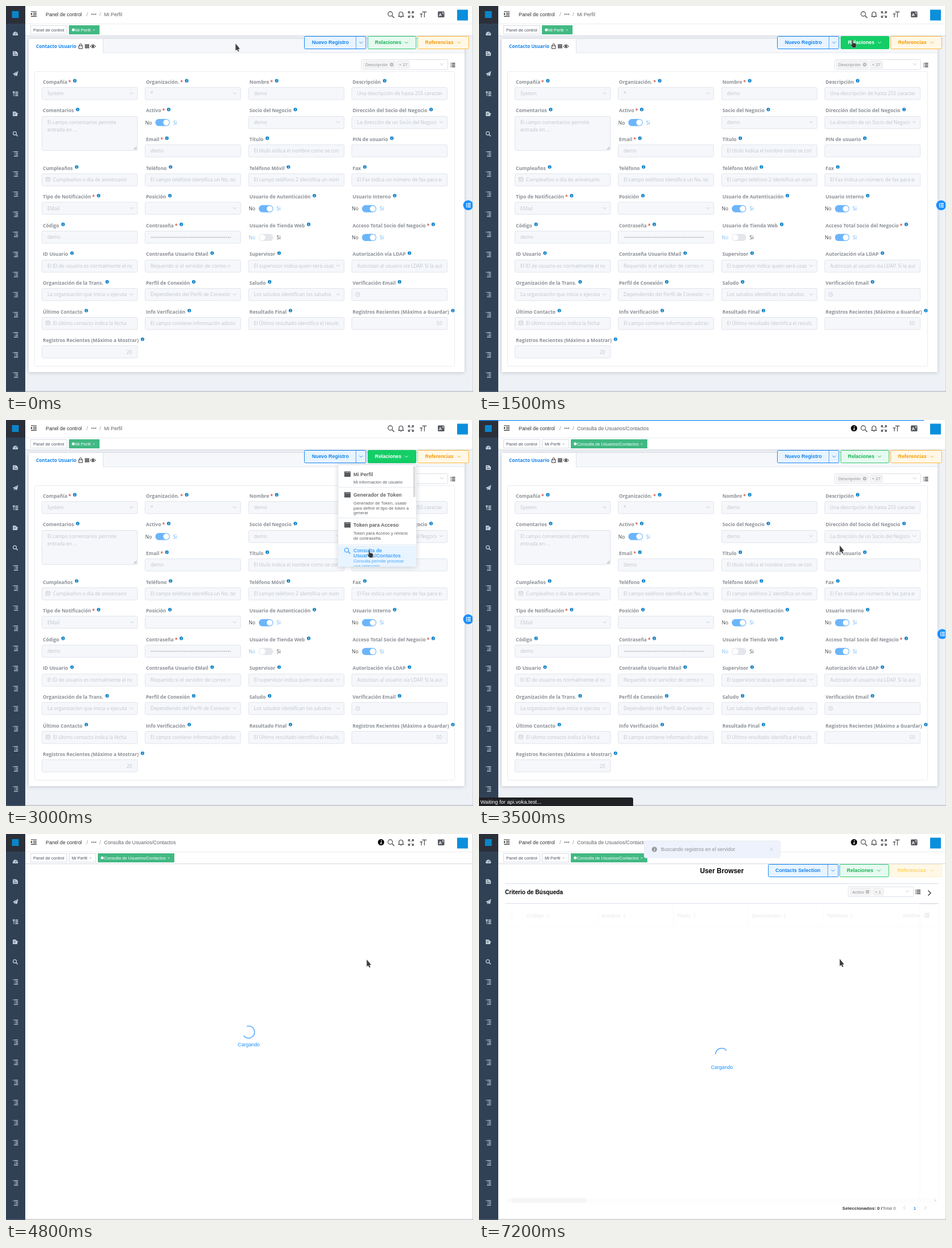
Animation, 824 px wide and 680 px high, one loop 8000 ms. Source, as an HTML page:

```html
<!DOCTYPE html>
<html lang="es">
<head>
<meta charset="utf-8">
<title>Mi Perfil</title>
<style>
html, body { margin: 0; width: 100%; height: 100%; overflow: hidden; background: #fff; }
svg { display: block; }
#stage { position: absolute; left: 0; top: 0; overflow: hidden; }
text { font: 8.84px "Liberation Sans", Arial, sans-serif; fill: #303133; white-space: pre; }
.b { font-weight: bold; }
.s { font-size: 7.58px; }
.f { font: 8.5px "Open Sans", sans-serif; fill: #c0c4cc; }
.l { font: bold 8.55px "Open Sans", sans-serif; fill: #8c9097; }
.tab { font: bold 8.2px "Open Sans", sans-serif; }
.title { font-size: 11.85px; }
.sub { font-size: 10.1px; }
.foot { font-size: 8.1px; }
.url { font-size: 9.4px; }

/* every part runs on the same 8 s clock */
.a { animation: 8s linear -30ms infinite; }
.k { animation-timing-function: step-end; }
#cursor { animation-name: cursor; }
#arrow { animation-name: arrow; }
#hand { animation-name: hand; }
#relHot { animation-name: relHot; }
#menu { animation-name: menu; transform-origin: 655px 79px; }
#hot0 { animation-name: hot0; }
#hot1 { animation-name: hot1; }
#hot2 { animation-name: hot2; }
#hot3 { animation-name: hot3; }
#navA { animation-name: navA; }
#navB { animation-name: navB; }
#profile { animation-name: profile; }
#fields { animation-name: fields; }
#fab { animation-name: fab; }
#progress { animation-name: progress; transform-origin: 0 0; }
#status { animation-name: status; }
#loader { animation-name: loader; }
#turn { animation-name: turn; transform-origin: 428px 349px; }
#dash { animation-name: dash; }
#browser { animation-name: browser; }
#mask { animation-name: mask; }
#arc { animation-name: arc; transform-origin: 428px 388px; }
#message { animation-name: message; }

@keyframes cursor {
  0%, 5% { transform: translate(404.5px, 66px); animation-timing-function: ease-in-out; }
  15%, 16.6% { transform: translate(802px, 11px); animation-timing-function: ease-in-out; }
  18.7%, 27% { transform: translate(655px, 59px); animation-timing-function: ease-in-out; }
  30%, 36.8% { transform: translate(638px, 203px); }
  37.5%, 40% { transform: translate(637px, 228px); }
  41%, 89.99% { transform: translate(636px, 221px); }
  90%, 100% { transform: translate(636px, 220px); }
}
@keyframes arrow { 0% { opacity: 1 } 14% { opacity: 0 } 40% { opacity: 1 } }
@keyframes hand { 0% { opacity: 0 } 14% { opacity: 1 } 40% { opacity: 0 } }
@keyframes relHot { 0% { opacity: 0 } 18.5% { opacity: 1 } 40% { opacity: 0 } 100% { opacity: 0 } }
@keyframes menu {
  0%, 20% { opacity: 0; transform: scaleY(0); animation-timing-function: ease-out; }
  23.7%, 40% { opacity: 1; transform: none; }
  42.5% { opacity: 0; transform: scaleY(0); }
  100% { opacity: 0; transform: scaleY(0); }
}
@keyframes hot0 { 0% { opacity: 0 } 27.5% { opacity: 1 } 28.6% { opacity: 0 } 100% { opacity: 0 } }
@keyframes hot1 { 0% { opacity: 0 } 28.6% { opacity: 1 } 29.6% { opacity: 0 } 100% { opacity: 0 } }
@keyframes hot2 { 0% { opacity: 0 } 29.6% { opacity: 1 } 37.4% { opacity: 0 } 100% { opacity: 0 } }
@keyframes hot3 { 0% { opacity: 0 } 37.4% { opacity: 1 } 100% { opacity: 1 } }
@keyframes navA { 0% { opacity: 1 } 44% { opacity: 0 } 100% { opacity: 0 } }
@keyframes navB { 0% { opacity: 0 } 44% { opacity: 1 } 100% { opacity: 1 } }
@keyframes profile {
  0%, 45% { opacity: 1; transform: none; }
  46.25%, 46.9% { opacity: .65; transform: translateX(8px); }
  50%, 100% { opacity: 0; transform: translateX(30px); }
}
@keyframes fields { 0%, 45% { opacity: 1 } 46.25%, 100% { opacity: .78 } }
@keyframes fab { 0% { transform: none } 44% { transform: translate(2px, 26px) } 100% { transform: translate(2px, 26px) } }
@keyframes progress {
  0%, 40% { opacity: 1; transform: scaleX(0); animation-timing-function: ease-out; }
  45% { opacity: 1; transform: none; }
  46.5% { opacity: .5; transform: none; }
  49%, 100% { opacity: 0; transform: none; }
}
@keyframes status { 0% { opacity: 0 } 42.5% { opacity: 1 } 50% { opacity: 0 } 100% { opacity: 0 } }
@keyframes loader {
  0%, 50% { opacity: 0; transform: translateX(-30px); animation-timing-function: ease; }
  56.25%, 74.99% { opacity: 1; transform: none; }
  75%, 100% { opacity: 0; transform: none; }
}
@keyframes turn { 0%, 50.625% { transform: none } 70%, 100% { transform: rotate(279deg) } }
@keyframes dash {
  0%, 50.625% { stroke-dasharray: 1 200; stroke-dashoffset: 0; animation-timing-function: ease-in-out; }
  60% { stroke-dasharray: 90 150; stroke-dashoffset: -40; animation-timing-function: ease-in-out; }
  69.37% { stroke-dasharray: 90 150; stroke-dashoffset: -120; }
  69.38% { stroke-dasharray: 1 200; stroke-dashoffset: 0; }
  70%, 100% { stroke-dasharray: 2 200; stroke-dashoffset: -.5; }
}
@keyframes browser { 0% { opacity: 0 } 75% { opacity: 1 } 100% { opacity: 1 } }
@keyframes mask { 0% { opacity: 0 } 77.5% { opacity: 1 } 100% { opacity: 1 } }
@keyframes arc {
  0% { transform: rotate(20deg); stroke-dasharray: 60 360; }
  82.5% { transform: rotate(180deg); stroke-dasharray: 145 360; }
  100% { transform: rotate(180deg); stroke-dasharray: 145 360; }
}
@keyframes message { 0% { opacity: 0 } 77.5% { opacity: .5 } 82.5% { opacity: 1 } 100% { opacity: 1 } }
</style>
</head>
<body>
<svg id="stage" width="824" height="680" viewBox="0 0 824 680"></svg>
<script>
const pen = document.createElement('canvas').getContext('2d');
const widthOf = (s, font) => { pen.font = font; return pen.measureText(s).width; };

const text = (x, y, s, cls = '', fill = '', anchor = '') =>
  `<text x="${x}" y="${y}" class="${cls}"${fill && ` style="fill:${fill}"`}${anchor && ` text-anchor="${anchor}"`}>${s}</text>`;
const rect = (x, y, w, h, fill, line = 'none', r = 0, extra = '') =>
  `<rect x="${x}" y="${y}" width="${w}" height="${h}" fill="${fill}" stroke="${line}" rx="${r}" ${extra}/>`;
const line = (d, color, w = 1, extra = '') =>
  `<path d="${d}" fill="none" stroke="${color}" stroke-width="${w}" ${extra}/>`;
const shape = (d, fill) => `<path d="${d}" fill="${fill}"/>`;
const disc = (x, y, r, fill) => `<circle cx="${x}" cy="${y}" r="${r}" fill="${fill}"/>`;
const ring = (x, y, r, color, w = 1, extra = '') =>
  `<circle cx="${x}" cy="${y}" r="${r}" fill="none" stroke="${color}" stroke-width="${w}" ${extra}/>`;
const group = (id, body, step = true) => `<g id="${id}" class="a${step ? ' k' : ''}">${body}</g>`;
const clip = (x, y, w, h, body) => `<svg x="${x}" y="${y}" width="${w}" height="${h}">${body}</svg>`;

const caret = (x, y, color = '#c0c4cc') => line(`M${x - 3} ${y - 1.5}l3 3 3-3`, color, .9);
const cross = (x, y, r, color) => line(`M${x - r} ${y - r}l${2 * r} ${2 * r}m0 ${-2 * r}l${-2 * r} ${2 * r}`, color, .8);
const info = (x, y, r, fill) => disc(x, y, r, fill) +
  line(`M${x + r * .1} ${y - r * .6}v${r * .3}m0 ${r * .2}l${-r * .15} ${r * .75}`, '#fff', r * .3);
const lens = (x, y, r, color, w) => ring(x - 1, y - 1, r, color, w) +
  line(`M${x - 1 + r * .75} ${y - 1 + r * .75}l${r} ${r}`, color, w * 1.3);
const list = (x, y, color, w = 8) => [-3, 0, 3].map(d =>
  line(`M${x - w / 2} ${y + d}h1.3m1 0h${w - 2.3}`, color, 1.3)).join('');

function sidebar() {
  const c = '#c5d0dc', at = n => 48.3 + 35.4 * n;
  let s = rect(0, 0, 34, 680, '#304156') + rect(0, 0, 34, 31, '#2b2f3a') + rect(10.5, 9, 12, 12, '#0b86c9');
  let y = at(0);
  s += shape(`M12.3 ${y + 3.5}a4.6 4.6 0 1 1 8.4 0z`, c) + line(`M16.5 ${y + 2}l1.3-3.6M13.5 ${y}h1M18.8 ${y}h1`, '#304156', .9);
  y = at(1);
  s += shape(`M12 ${y - 4}h6l3 3v5h-9z`, c) + line(`M13.5 ${y - 1.5}h3M13.5 ${y + 1.5}h6`, '#304156');
  y = at(2);
  s += shape(`M12 ${y + .5}l9.5-5-2 9-3-1.5-1.8 1.8v-2.6z`, c) + line(`M14.8 ${y + 2}l5-5`, '#304156', .6);
  y = at(3);
  s += rect(12, y - 4, 3.5, 2.4, c) + line(`M13.3 ${y - 2}v5.4h3M13.3 ${y}h3`, c, .8) +
    [-2.8, .2, 3.2].map(d => line(`M16.6 ${y + d}h4.8`, c, 1.8)).join('');
  y = at(4);
  s += shape(`M12 ${y - 4}h5l3 3v5h-8z`, c) + line(`M13.5 ${y - 1}h4M13.5 ${y + 1.2}h3`, '#304156', .8) +
    line(`M17 ${y + 3}l4-3.5`, c, 1.4);
  s += lens(16.5, at(5), 3, c, 1.2);
  for (let n = 6; n < 18; n++) {
    y = at(n);
    s += line(`M12 ${y - 4}h1.2m1 0h7M15 ${y - 1.3}h1m1 0h4.2M15 ${y + 1.4}h1m1 0h4.2M14 ${y + 4}h7.2`, c, 1.2);
  }
  return s;
}

function topBar() {
  const c = '#55585e';
  return rect(34, 0, 790, 52, '#fff') + line('M34 31.5H824', '#ebedf0') + line('M34 52.5H824', '#d3d7df') +
    line('M44 10h10M48 12.8h6M48 15.5h6M44 18.2h10', '#222', 1.2) + shape('M44 12l2.8 2.1-2.8 2.1z', '#222') +
    text(70, 17.5, 'Panel de control') + text(142, 17.5, '/', '', '#909399') +
    [151.8, 155, 158.2].map(x => disc(x, 14.5, 1.1, '#555')).join('') + text(165, 17.5, '/', '', '#909399') +
    lens(679, 15, 4, c, 1.3) +
    line('M692 18.3h10M693.5 18v-4a3.5 3.5 0 0 1 7 0v4M695.8 20h2.4', '#444', 1.2) +
    line('M710 13v-3h3m3 0h3v3m0 4v3h-3m-3 0h-3v-3M710.3 10.3l3 3m2.4 3.4l3 3m0-9.4l-3 3m-2.4 3.4l-3 3', c, 1.3) +
    line('M734.5 10.5h7.5M738.3 10.5V20M730.5 14h4.5M732.8 14v6', c, 1.3) +
    rect(762, 9.5, 11.5, 10.5, c, 'none', 1.5) + text(763.6, 17.8, 'A', 'b s', '#fff') + line('M769.5 12h3M771 11v3.5', '#fff', .8) +
    rect(796, 6.5, 19, 19, '#0b8fdc');
}

function tag(x, w, s, active, closable = true) {
  return rect(x + .5, 34.5, w - 1, 15, active ? '#42b983' : '#fff', active ? '#42b983' : '#d8dce5') +
    (active ? disc(x + 7.8, 42, 2.5, '#fff') : '') +
    text(x + (active ? 11 : 5), 45, s, 's', active ? '#fff' : '#495060') +
    (closable ? cross(x + w - 10, 42.3, 1.2, active ? '#d5efe4' : '#aaa') : '');
}

const blue = ['#e8f4ff', '#1587f5', '#1283f0'], green = ['#e7faf0', '#2fc873', '#16b455'],
  amber = ['#fff8e6', '#ffb83a', '#f79a08'], pale = ['#fff8e6', '#fff0cc', '#ffd466'], solid = ['#13ce66', '#13ce66', '#fff'];
function button(x, w, s, tx, cx, [bg, edge, ink], split) {
  return rect(x + .5, 53.5, w - 1, 22, bg, edge, 2) + text(tx, 67.4, s, 'b', ink) +
    caret(cx, 64.3, ink) + (split ? line(`M${split + .5} 54v21`, edge, .7) : '');
}

function filter(x, w, tags, y) {
  let s = rect(x + .5, y + .5, w - 1, 17.5, '#fff', '#dcdfe6', 2);
  tags.forEach(([tx, tw, label, closable]) => {
    s += rect(tx, y + 3, tw, 12.5, '#f4f4f5', '#e9e9eb', 2) + text(tx + 3.5, y + 12, label, 's', '#909399');
    if (closable) s += disc(tx + tw - 6.5, y + 9.2, 3.2, '#b4b6ba') + cross(tx + tw - 6.5, y + 9.2, 1.1, '#fff');
  });
  return s + caret(x + w - 11, y + 8.5);
}

// column, row, label (* = required), kind, value
const formRows = `0|0|Compañía*|select|System
0|1|Comentarios|area|
0|3|Cumpleaños|date|Cumpleaños o día de aniversario
0|4|Tipo de Notificación*|select|EMail
0|5|Código|text|demo
0|6|ID Usuario|text|El ID de usuario es normalmente el nombre
0|7|Organización de la Trans.|select|La organización que inicia o ejecuta la
0|8|Último Contacto|date|El último contacto indica la fecha en
0|9|Registros Recientes (Máximo a Mostrar)|number|20
1|0|Organización.*|select|*
1|1|Activo*|on|
1|2|Email*|text|demo
1|3|Teléfono|text|El campo teléfono identifica un No. telefónico
1|4|Posición|select|
1|5|Contraseña*|dots|
1|6|Contraseña Usuario EMail|secret|Requerido si el servidor de correo requiere
1|7|Perfil de Conexión|select|Dependiendo del Perfil de Conexión
1|8|Info Verificación|text|El campo contiene información adicional
2|0|Nombre*|text|demo
2|1|Socio del Negocio|select|demo
2|2|Título|text|El título indica el nombre como se conoce
2|3|Teléfono Móvil|text|El campo teléfono 2 identifica un número
2|4|Usuario de Autenticación|on|
2|5|Usuario de Tienda Web|off|
2|6|Supervisor|select|El supervisor indica quien será usado
2|7|Saludo|select|Los saludos identifican los saludos
2|8|Resultado Final|text|El Último resultado identifica el resultado
3|0|Descripción|text|Una descripción de hasta 255 caracteres
3|1|Dirección del Socio del Negocio|select|La dirección de un Socio del Negocio
3|2|PIN de usuario|text|
3|3|Fax|text|El Fax indica un número de fax para este
3|4|Usuario Interno|on|
3|5|Acceso Total Socio del Negocio*|on|
3|6|Autorización vía LDAP|text|Autorizan al usuario vía LDAP. Si la autoriza
3|7|Verificación Email|clock|
3|8|Registros Recientes (Máximo a Guardar)|number|50`;

function field(row) {
  const [col, r, name, kind, value] = row.split('|');
  const x = [63, 245, 427.5, 609.5][col], y = 133.5 + 50.6 * r, top = Math.round(y + 9.5), base = y + 23.6;
  const label = name.replace('*', ''), need = label !== name;
  let end = x + 2 + widthOf(label, 'bold 8.55px "Open Sans"');
  let s = text(x + 2, y + 3.2, label, 'l');
  if (need) { s += text(end + 2, y + 3.2, '*', 'l', '#e0583f'); end += 6.5; }
  s += info(end + 6.8, y - 1.8, 3.1, '#1283c8');
  if (kind === 'on' || kind === 'off') {
    const on = kind === 'on', cy = y + 21.2;
    return s + text(x + .8, cy + 3.2, 'No', 'f', on ? '#44474c' : '#7fbdfa') +
      rect(x + 18.5, cy - 6.3, 25.5, 12.6, on ? '#6cb5fb' : '#e4e6ec', 'none', 6.3) +
      disc(x + (on ? 37.7 : 24.8), cy, 5.2, '#fff') + text(x + 50, cy + 3.2, 'Si', 'f', on ? '#5aabfa' : '#44474c');
  }
  s += rect(x + .5, top + .5, 168.5, kind === 'area' ? 60 : 21.5, '#f5f7fa', '#e0e4ec', 2);
  if (kind === 'area')
    return s + text(x + 10, top + 13.8, 'El campo comentarios permite', 'f') + text(x + 10, top + 26.8, 'entrada en ...', 'f') +
      line(`M${x + 162.5} ${top + 59}l5-5m-2 5l2-2`, '#777', .8);
  if (kind === 'dots')
    return s + line(`M${x + 12} ${top + 11.5}h139`, '#b2b6be', 2.2, 'stroke-linecap="round" stroke-dasharray="0 3.22"');
  if (kind === 'number') return s + text(x + 159.5, base, value, 'f', '', 'end');
  if (kind === 'clock') return s + ring(x + 11, y + 20.5, 3.6, '#c0c4cc', .8) + line(`M${x + 11} ${y + 18.5}v2.2h2`, '#c0c4cc', .8);
  const dx = kind === 'date' ? 20 : 10, room = kind === 'text' ? 159.5 : 150.5;
  if (kind === 'date') s += rect(x + 7.5, y + 17, 7, 6.6, 'none', '#c0c4cc', .5, 'stroke-width=".8"') +
    line(`M${x + 7.5} ${y + 19.3}h7M${x + 9.3} ${y + 16}v2m3.4-2v2M${x + 9} ${y + 21.4}h4`, '#c0c4cc', .7);
  if (kind === 'select') s += caret(x + 158.5, y + 20.3);
  return s + clip(x + dx, top, room - dx, 22, text(0, base - top, value, 'f'));
}

function profile() {
  const strip = rect(34, 53, 790, 627, '#eef1f6') +
    rect(40, 58, 769, 587, '#fff', 'none', 0, 'style="filter:drop-shadow(0 1px 3px rgba(0,0,0,.18))"') +
    rect(40, 58, 769, 24.5, '#f5f7fa') + line('M40 82.5H809', '#e4e7ed') + rect(40, 58, 131, 26, '#fff') + line('M171.5 58v25', '#dfe3ea') +
    text(53, 74.3, 'Contacto Usuario', 'tab', '#1683ee') +
    rect(128.5, 70, 6.4, 5, 'none', '#333') + line('M129.8 70v-1.5a1.9 1.9 0 0 1 3.8 0V70', '#333') +
    line('M139 68.5h8M139 71h8M139 73.5h8', '#222', 1.4) +
    line('M149 71q4.5-5.5 9 0q-4.5 5.5-9 0z', '#222') + disc(153.5, 71, 1.7, '#222');
  const tools = button(526, 109.5, 'Nuevo Registro', 539.7, 626.5, blue, 617) +
    button(638, 86, 'Relaciones', 651, 706.5, green) + button(726, 91, 'Referencias', 739.5, 799.5, amber) +
    group('relHot', button(638, 86, 'Relaciones', 651, 706.5, solid));
  const form = filter(627, 153, [[630.5, 56.5, 'Descripción', true], [690, 22, '+ 27']], 94) +
    rect(50.5, 115.5, 741, 519, 'none', '#e9ecf2', 2) + formRows.split('\n').map(field).join('');
  const fab = disc(815.5, 351, 8.8, '#1890ff') + list(816, 351, '#fff', 8) + line('M812.6 348v6', '#fff', .8);
  return group('profile', strip + tools + list(788.5, 104, '#333') + group('fields', form, false) + group('fab', fab), false);
}

const items = [
  [82, 36, 98.6, ['Mi Perfil'], ['Mi información de usuario']],
  [119, 53, 135, ['Generador de Token'], ['Generador de Token, usado', 'para definir el tipo de token a', 'generar']],
  [175, 44, 188, ['Token para Acceso'], ['Token para Acceso y reinicio', 'de contraseña']],
  [221, 37, 233.2, ['Consulta de', 'Usuarios/Contactos'], ['Consulta permite procesar', 'una selección']]
];
function item([top, h, y, titles, subs], n, hot) {
  const ink = hot ? '#46a6ff' : '#606266', subY = y + (n === 3 ? 17.6 : 13.8);
  return (hot ? rect(586.5, top, 137, h, '#e8f4ff') : '') +
    (n === 3 ? lens(602, y - 3, 3.6, ink, 1.3)
      : rect(597, y - 8, 11, 9.5, '#55585d') + line(`M599 ${y - 6.2}h2m1 0h2m1 0h2`, '#fff', .8)) +
    titles.map((s, i) => text(613, y + i * 9, s, 'b', ink)).join('') +
    subs.map((s, i) => text(613, subY + i * 8.8, s, 's', ink)).join('') +
    (n < 3 ? line(`M587 ${[118.5, 172.5, 219.5][n]}h136`, '#e4e8ef') : '');
}
function menu() {
  const body = items.map((d, n) => item(d, n)).join('') + items.map((d, n) => group('hot' + n, item(d, n, true))).join('');
  return group('menu', shape('M676 80l4-4 4 4z', '#fff') +
    rect(586, 79, 138, 179, '#fff', '#e6ebf5', 2, 'style="filter:drop-shadow(0 1px 4px rgba(0,0,0,.16))"') +
    clip(0, 0, 824, 258, body) + rect(718.5, 81, 4, 55, '#d9dbde', 'none', 2), false);
}

function table() {
  const xs = [77, 209.5, 342.5, 475, 607.5, 740.5], edge = '#dfe4ec';
  let head = rect(53.5, 139.5, 8, 8, '#edf2fc', '#dcdfe6', 1);
  ['Código', 'Nombre', 'Título', 'Descripción', 'Teléfono', 'Teléfono Móvil'].forEach((name, i) => {
    const x = xs[i] + 6.7, end = x + widthOf(name, 'bold 8.84px "Liberation Sans"') + 7;
    head += line(`M${xs[i]} 125v37`, edge) + text(x, 147, name, 'b', '#909399') +
      shape(`M${end - 3} 142.6l3-3.4 3 3.4zM${end - 3} 144.2l3 3.4 3-3.4z`, '#c0c4cc');
  });
  return line('M47 162.5H811', edge) + clip(0, 0, 779, 680, head) +
    rect(779, 125, 31, 516, '#fff', 'none', 0, 'style="filter:drop-shadow(-1px 0 3px rgba(0,0,0,.12))"') +
    line('M779 162.5h32M810.5 125v37', edge) + list(790, 143, '#555', 10) +
    rect(47, 641, 764, 9.5, '#f1f1f1') + rect(57, 641.5, 132, 8, '#c1c1c1') +
    shape('M53.5 643.2v4.6l-3-2.3z', '#a5a5a5') + shape('M804 643.2v4.6l3-2.3z', '#505050');
}

function browser() {
  const page = rect(34, 53, 789, 625, '#fff') + text(428.5, 69, 'User Browser', 'b title', '#000', 'middle') +
    button(510, 124.5, 'Contacts Selection', 523, 624.5, blue, 615) +
    button(636, 87.5, 'Relaciones', 649, 705.5, green) + button(725, 92, 'Referencias', 738.5, 799, pale) +
    line('M46 87.5H811M46 122.5H811', '#d9dee8') + text(46, 106.2, 'Criterio de Búsqueda', 'b sub', '#000') +
    filter(651, 116, [[655, 37, 'Activo', true], [695, 19, '+ 1']], 92.5) + list(774.5, 102, '#333', 9) +
    line('M792.5 99.5l4.5 4.5-4.5 4.5', '#222', 1.2) + table() +
    text(641, 662, '<tspan class="b">Seleccionados: 0 /</tspan><tspan fill="#606266">Total 0</tspan>', 'foot') +
    line('M752 655.5l-3 3 3 3M786 655.5l3 3-3 3', '#b8bcc4', .9) + text(766.7, 661.5, '1', 'b s', '#1890ff');
  const mask = rect(46, 124, 766, 527, 'rgba(255,255,255,.83)') +
    ring(428, 388, 10.7, '#409eff', 1.3, 'id="arc" class="a k" pathLength="360"') + text(409.2, 413.6, 'Cargando', '', '#1890ff');
  return group('browser', page + group('mask', mask));
}

const loader = group('loader', group('turn', ring(428, 349, 10.7, '#409eff', 1.3,
  'id="dash" class="a" pathLength="125.6" stroke-linecap="round"'), false) + text(409, 374.2, 'Cargando', '', '#1890ff'), false);
const navA = group('navA', text(173, 17.5, 'Mi Perfil', '', '#5f6268') + tag(111, 54, 'Mi Perfil', true));
const navB = group('navB', text(173, 17.5, 'Consulta de Usuarios/Contactos', '', '#5f6268') +
  info(661.7, 14.5, 5.5, '#000') + tag(111, 48, 'Mi Perfil') + tag(162, 135, 'Consulta de Usuarios/Contactos', true));
const message = group('message', rect(291.5, 12, 240, 30, '#edf2fc', '#e8ecf5', 3) + info(309.5, 27, 4.5, '#909399') +
  text(321, 30, 'Buscando registros en el servidor', '', '#909399') + cross(516, 27, 2.6, '#c0c4cc'));
const status = group('status', shape('M0 665h269q3 0 3 3v12H0z', '#202124') +
  text(2.5, 676, 'Waiting for api.voka.test...', 'url', '#fff'));
const arrowPath = 'M.5 0v12.8l2.6-2.4 2 4 1.8-1-1.7-3.5 3-.3z';
const cursor = group('cursor',
  group('arrow', line(arrowPath, '#fff', 1.2) + shape(arrowPath, '#3c3c3c')) +
  group('hand', `<path d="M3 1.2q1-1.4 2 0v4.6l4.6 1.2q1.4.5 1.2 2l-.9 5.6H4.6L.7 9.8q-.6-1.5.8-1.3L3 9.6z" fill="#333" stroke="#ddd" stroke-width=".5"/>`), false);

document.getElementById('stage').innerHTML = rect(0, 0, 824, 680, '#fff') + profile() + loader + browser() +
  topBar() + tag(43, 65, 'Panel de control', false, false) + navA + navB + menu() + sidebar() +
  line('M823.5 0v680', '#d5d7da') + rect(0, 678, 824, 2, 'rgba(120,125,135,.3)') +
  group('progress', rect(0, 0, 824, 1.3, '#1890ff'), false) + status + message + cursor;
</script>
</body>
</html>
```
